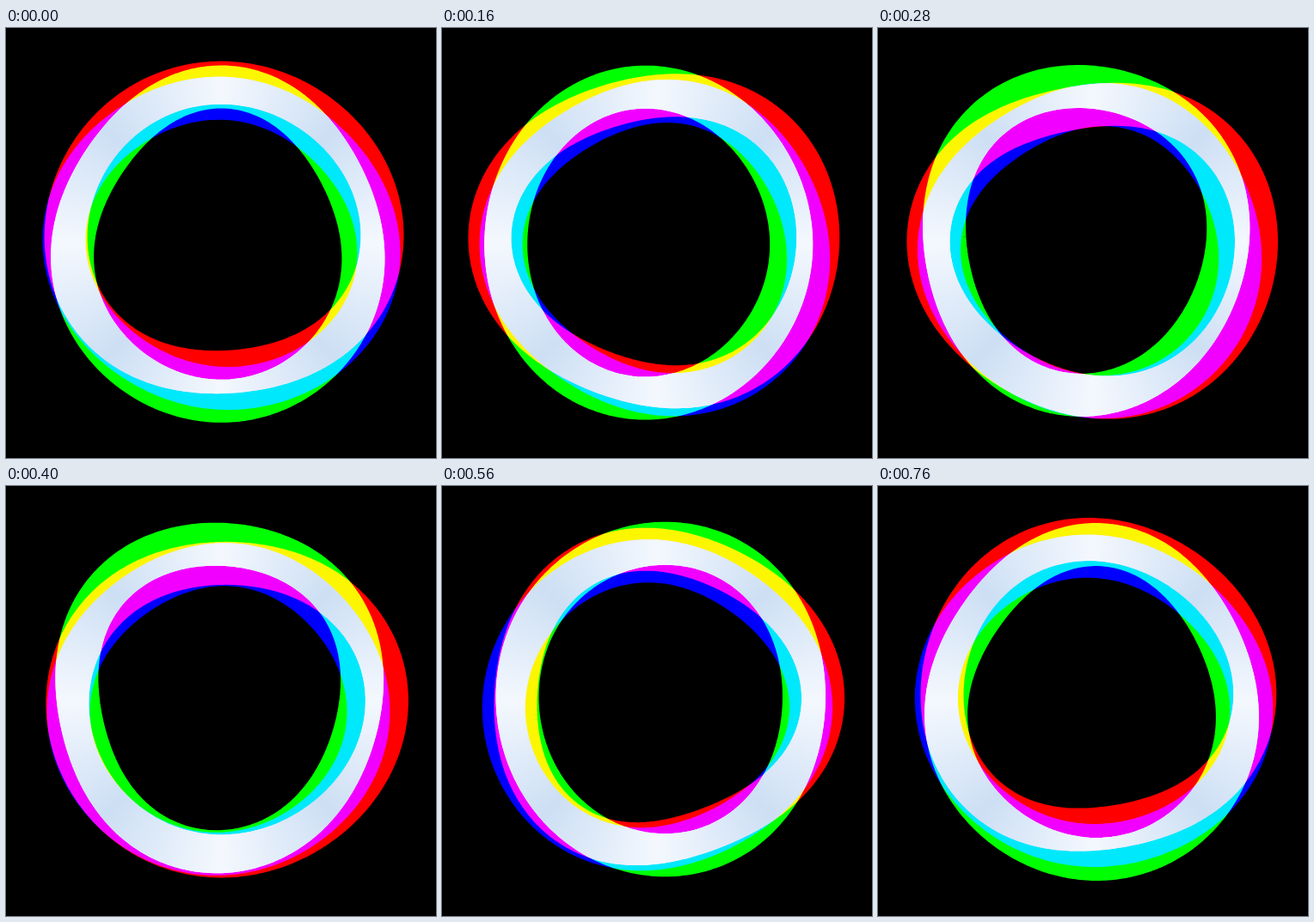
These frames come from a looping animation (500 by 500 pixels, 800 ms). An HTML page with a canvas:

```html
<!DOCTYPE html>
<html lang="en">
<head>
<meta charset="utf-8">
<title>Wobbling light rings</title>
<style>
html, body { margin: 0; width: 100%; height: 100%; overflow: hidden; background: #000; }
canvas { display: block; }
</style>
</head>
<body>
<canvas id="stage" width="500" height="500"></canvas>
<script>
const SIZE = 500, CENTER = 250, RADIUS = 175, WIDTH = 50;
const LOOP = 800, STEP = 40, POINTS = 180;
const { sin, cos, PI } = Math;

// Radius offset at angle a and loop phase t: a resting shape plus two standing waves.
const redWobble = (a, t) =>
  2 + 5.7 * cos(a + 0.78) + 7.8 * cos(2 * a + 0.1) + 1.3 * cos(3 * a)
  + cos(t) * (-1 - 12.1 * sin(a + 0.15) + 2.2 * sin(3 * a))
  + sin(t) * (3 + 4.7 * sin(a - 0.4) + 3.9 * cos(2 * a - 0.34) - 7.3 * cos(3 * a - 0.28));

const greenWobble = (a, t) =>
  -1.5 - 3 * cos(a - 0.41) - 7.2 * cos(2 * a)
  + cos(t) * (0.5 + 6.3 * sin(a) + 4.1 * sin(3 * a - 0.26) + 1.5 * cos(4 * a))
  + sin(t) * (-1 - 9.1 * cos(a - 0.08) + 2.2 * cos(3 * a + 0.38));

const blueWobble = (a, t) =>
  -2.9 + 6.2 * sin(a - 0.13) + 5.1 * cos(2 * a - 0.22) + 1.4 * sin(3 * a - 0.43) + 1.4 * cos(4 * a - 0.43)
  + cos(t) * (2.3 - 4.9 * sin(a - 0.33) + 3.3 * cos(2 * a - 0.87))
  + sin(t) * (2.9 * cos(a - 0.76) + 1.9 * cos(2 * a - 2.5) - 4.5 * cos(3 * a));

const view = document.getElementById('stage').getContext('2d');
const layer = document.createElement('canvas');
layer.width = layer.height = SIZE;
const mix = layer.getContext('2d');
view.lineWidth = mix.lineWidth = WIDTH;
view.lineJoin = mix.lineJoin = 'round';

// Bright towards the four sides, bluish on the diagonals.
const sheen = mix.createConicGradient(0, CENTER, CENTER);
for (let i = 0; i <= 8; i++) sheen.addColorStop(i / 8, i % 2 ? '#cddff4' : '#f4f8fe');

function ringPath(wobble, phase) {
  const path = new Path2D();
  for (let i = 0; i < POINTS; i++) {
    const a = i / POINTS * 2 * PI, r = RADIUS + wobble(a, phase);
    path.lineTo(CENTER + r * cos(a), CENTER + r * sin(a));
  }
  path.closePath();
  return path;
}

// Paints the area shared by all the given rings.
function paintOverlap(paths, fill, blend) {
  mix.globalCompositeOperation = 'copy';
  mix.strokeStyle = fill;
  for (const path of paths) {
    mix.stroke(path);
    mix.globalCompositeOperation = 'destination-in';
  }
  view.globalCompositeOperation = blend;
  view.drawImage(layer, 0, 0);
}

function addRing(path, color) {
  view.globalCompositeOperation = 'lighter';
  view.strokeStyle = color;
  view.stroke(path);
}

function draw(time) {
  const phase = time / LOOP * 2 * PI;
  const [red, green, blue] = [redWobble, greenWobble, blueWobble].map(w => ringPath(w, phase));

  view.globalCompositeOperation = 'source-over';
  view.fillStyle = '#000';
  view.fillRect(0, 0, SIZE, SIZE);

  addRing(red, '#f00');
  addRing(green, '#0f0');
  addRing(blue, '#00f');

  paintOverlap([red, green], '#fcf6ff', 'multiply');
  paintOverlap([red, blue], '#f2ffff', 'multiply');
  paintOverlap([green, blue], '#ffe8fc', 'multiply');
  paintOverlap([red, green, blue], sheen, 'source-over');
}

function tick() {
  draw(Math.floor(performance.now() % LOOP / STEP) * STEP);
  requestAnimationFrame(tick);
}
tick();
</script>
</body>
</html>
```
